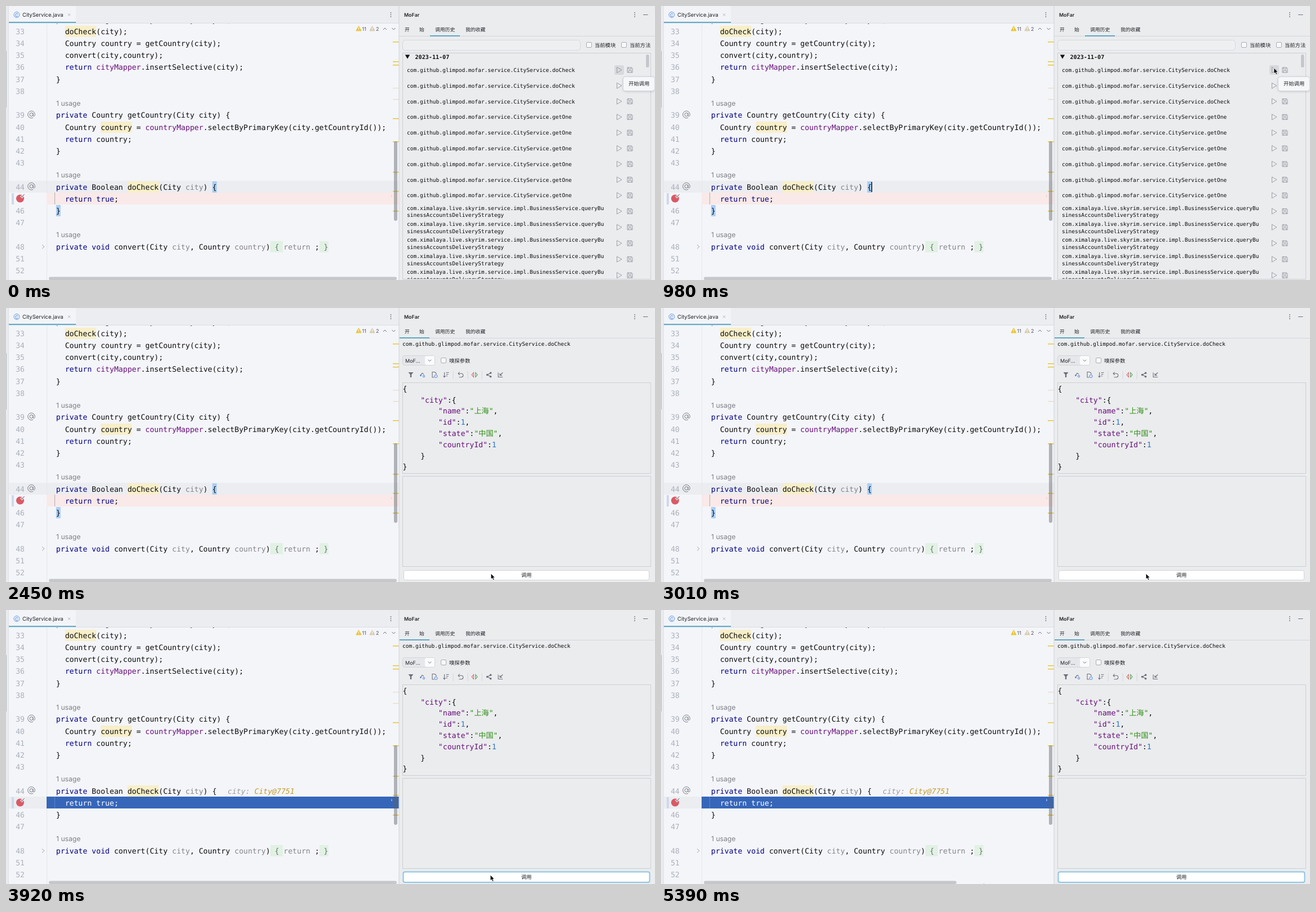
These frames come from a looping animation (1151x486 px, 5460 ms). An HTML page with a canvas:

```html
<!DOCTYPE html>
<html lang="zh">
<head>
<meta charset="utf-8">
<title>Editor demo</title>
<style>
html, body { margin: 0; width: 100%; height: 100%; overflow: hidden; background: #ebecee; }
canvas { display: block; }
</style>
</head>
<body>
<canvas id="stage" width="1151" height="486"></canvas>
<script>
const ctx = document.getElementById('stage').getContext('2d');
ctx.textRendering = 'geometricPrecision';
ctx.fontKerning = 'none';
const LOOP = 5460, STEP = 70;
const OPEN_PANEL = 1050, BREAK_HIT = 3780, NARROW_BAR = 4480;
const MONO = '"DejaVu Sans Mono", "Noto Sans CJK SC", monospace';
const UI = 'Inter, "Noto Sans CJK SC", sans-serif';
const CODE = '13.15px ' + MONO, LIST = '9.53px ' + MONO;
const CW = 7.917, LEFT = 88.8, PITCH = 21.22;
const INK = '#0c0c0e', KEY = '#000080', FIELD = '#660e7a', DIM = '#858589', ICON = '#6c707a';
const SERVICE = 'com.github.glimpod.mofar.service.CityService.';

function box(x, y, w, h, fill) {
  ctx.fillStyle = fill;
  ctx.fillRect(x, y, w, h);
}

function round(x, y, w, h, r, fill, stroke, width = 1) {
  ctx.beginPath();
  ctx.roundRect(x, y, w, h, r);
  if (fill) { ctx.fillStyle = fill; ctx.fill(); }
  if (stroke) { ctx.strokeStyle = stroke; ctx.lineWidth = width; ctx.stroke(); }
}

function text(s, x, y, font, color, align = 'left') {
  ctx.font = font;
  ctx.fillStyle = color;
  ctx.textAlign = align;
  ctx.fillText(s, x, y);
}

// Draws [string, color] pairs one after the other.
function runs(parts, x, y, font) {
  for (const [s, color] of parts) {
    text(s, x, y, font, color);
    x += ctx.measureText(s).width;
  }
}

function path(d, stroke, fill, x = 0, y = 0, width = 1) {
  ctx.save();
  ctx.translate(x, y);
  const p = new Path2D(d);
  if (fill) { ctx.fillStyle = fill; ctx.fill(p); }
  if (stroke) { ctx.strokeStyle = stroke; ctx.lineWidth = width; ctx.stroke(p); }
  ctx.restore();
}

function disc(x, y, r, fill, stroke) {
  ctx.beginPath();
  ctx.arc(x, y, r, 0, 7);
  ctx.fillStyle = fill;
  ctx.fill();
  if (stroke) { ctx.strokeStyle = stroke; ctx.lineWidth = 1; ctx.stroke(); }
}

function kebab(x, y) {
  for (const d of [-3.5, 0, 3.5]) disc(x, y + d, 0.9, ICON);
}

const rowY = i => 45 + i * PITCH;
const rowTop = i => Math.round(rowY(i) - 10.9);
const col = n => LEFT + n * CW;

function codeLine(row, indent, ...parts) {
  runs(parts, col(indent), rowY(row) + 4.8, CODE);
}

function mark(row, from, count, color) {
  box(col(from), rowTop(row) + 1, count * CW, 20, color);
}

function warning(x, color) {
  path('M0 -4.3L4.6 4H-4.6Z', color, color, x, 40);
  box(x - 0.5, 37.8, 1, 3.4, '#fff');
  box(x - 0.5, 42, 1, 1, '#fff');
}

function drawTabs() {
  box(0, 0, 697, 30, '#ebedf0');
  box(5, 0, 119, 30, '#f2f4f8');
  box(0, 30, 697, 1, '#dcdee3');
  box(5, 28, 119, 2, '#60acc8');
  disc(19, 15.5, 5, '#e6effc', '#6f9ad8');
  text('C', 19, 18.6, '8px ' + UI, '#4a7dca', 'center');
  text('CityService.java', 29, 19, '9.5px ' + UI, '#202226');
  path('M-2 -2L2 2M2 -2L-2 2', '#a9acb3', null, 112, 15.5, 0.9);
  kebab(682.5, 15.5);
}

function drawGutter() {
  const labels = ['33', '34', '35', '36', '37', '38', '', '39', '40', '41', '42', '43', '',
    '44', '', '46', '47', '', '48', '51', '52'];
  labels.forEach((n, i) => text(n, 33, rowY(i) + 4.8, CODE, '#abb0bb', 'right'));
  for (const row of [7, 13]) {
    path('M3 -2.8V1.2Q3 3 4.5 3Q6.3 3 6.3 0A6.3 6.3 0 1 0 3.2 5.4M3 0A3 3 0 1 0 -3 0A3 3 0 1 0 3 0',
      '#777b83', null, 45, rowY(row) - 1);
  }
  box(10, rowTop(14) + 1, 4, 20, '#cdd9eb');
  disc(25, 341.5, 7, '#da5965');
  path('M26 336.5L28.3 339L32.5 334', '#fff', null, 0, 0, 3);
  path('M26 336.5L28.3 339L32.5 334', '#5a5d63', null, 0, 0, 1.1);
  path('M-2 -3.5L2 0L-2 3.5', '#a4a8b0', null, 66, rowY(18));
}

function drawCode(paused, caret) {
  box(4, 31, 693, 455, '#f4f5f9');
  box(4, rowTop(paused ? 14 : 13), 693, 21, '#ebedf1');
  box(72, 31, 1, 455, '#e4e6eb');
  box(72, rowTop(14), 625, 21, paused ? '#3666b9' : '#f9e9e8');
  box(86, rowTop(14), 1, 21, paused ? '#5d85c8' : '#aeb0b8');

  const hint = '#f8efc9', fold = '#e1f1e4', brace = '#a9cef5';
  mark(0, 2, 7, hint);
  mark(8, 10, 7, hint);
  mark(13, 16, 7, hint);
  mark(18, 48, 2.8, fold);
  mark(18, 59, 2, fold);
  if (!paused) {
    mark(13, 35, 1, brace);
    mark(15, 0, 1, brace);
  }

  ctx.save();
  ctx.beginPath();
  ctx.rect(73, 31, 612, 455);
  ctx.clip();
  codeLine(-1, 0, ['public ', KEY], ['Integer addCityInfo(City city) {', INK]);
  codeLine(0, 2, ['doCheck(city);', INK]);
  codeLine(1, 2, ['Country country = getCountry(city);', INK]);
  codeLine(2, 2, ['convert(city,country);', INK]);
  codeLine(3, 2, ['return ', KEY], ['cityMapper', FIELD], ['.insertSelective(city);', INK]);
  codeLine(4, 0, ['}', INK]);
  codeLine(7, 0, ['private ', KEY], ['Country getCountry(City city) {', INK]);
  codeLine(8, 2, ['Country country = ', INK], ['countryMapper', FIELD],
    ['.selectByPrimaryKey(city.getCountryId());', INK]);
  codeLine(9, 2, ['return ', KEY], ['country;', INK]);
  codeLine(10, 0, ['}', INK]);
  codeLine(13, 0, ['private ', KEY], ['Boolean doCheck(City ', INK], ['city', DIM], [') {', INK]);
  codeLine(14, 2, ['return true', paused ? '#fff' : KEY], [';', paused ? '#fff' : INK]);
  codeLine(15, 0, ['}', INK]);
  codeLine(18, 0, ['private void ', KEY], ['convert(City ', INK], ['city', DIM], [', Country ', INK],
    ['country', DIM], [') ', INK], ['{ ', '#68766b'], ['return ', DIM], ['; ', INK], ['}', '#68766b']);
  for (const row of [6, 12, 17]) text('1 usage', 89, rowY(row) + 4.4, '12.2px ' + UI, '#7e8086');
  if (paused) {
    runs([['city: ', '#9a9ca2'], ['City@7751', '#c19a2c']], 393, rowY(13) + 4.8, 'italic ' + CODE);
  }
  ctx.restore();
  if (caret) box(373, rowTop(13) + 2, 1.4, 18, '#000');
  box(683.5, 335.5, 1, 3.5, paused ? '#dce6f7' : '#dccbcf');
}

function drawEditorEdges(narrow) {
  warning(625.5, '#ecc52f');
  text('11', 631.5, 43.6, '9px ' + UI, '#53565d');
  warning(649.5, '#d8cdb0');
  text('2', 656, 43.6, '9px ' + UI, '#53565d');
  path('M-3 1.5L0 -1.5L3 1.5', ICON, null, 672, 40.5);
  path('M-3 -1.5L0 1.5L3 -1.5', ICON, null, 687.5, 40.5);
  for (const y of [63, 98, 104, 199, 240, 294, 328, 363]) box(686, y, 11, 1.5, '#e5c63c');
  for (const y of [145, 165]) box(686, y, 11, 1.3, '#e4dfc5');
  round(688, 240, 6, 141, 3, 'rgba(95,98,104,.46)');
  round(76, 480.5, narrow ? 448 : 617, 5.5, 2.7, '#c5c7cb');
  box(0, 0, 4, 486, '#e9ebee');
  box(4, 0, 1, 486, '#dfe1e5');
  box(0, 80, 1, 100, '#b4b7bc');
}

function checkbox(x, y, label) {
  round(x + 0.5, y - 4.5, 9, 9, 1.5, '#f8f9fa', '#a9acb3');
  text(label, x + 15, y + 3.5, '9.3px ' + UI, '#202226');
}

function drawPanelHead(calling) {
  box(697, 0, 454, 486, '#ebecee');
  box(696.5, 0, 1, 486, '#d0d2d7');
  text('MoFar', 706, 19, '600 8.8px ' + UI, '#202226');
  kebab(1115, 15.5);
  box(1130, 15, 8.5, 1, ICON);
  box(697, 53, 454, 1, '#d3d5da');
  [['开', 707], ['始', 733], ['调用历史', 761], ['我的收藏', 815]].forEach(([s, x]) =>
    text(s, x, 45, '8.8px ' + UI, '#202226'));
  box(calling ? 698 : 752, 52, 53, 2, '#5ba8c3');
}

function rowIcons(y) {
  path('M-4 -5L4.5 0L-4 5Z', '#92969e', null, 1087.5, y, 0.9);
  path('M-4.5 -4.5H3L4.5 -3V4.5H-4.5ZM-2.5 -4.5V-1.5H2.2V-4.5M-2.5 4.5V1H2.5V4.5',
    '#868a92', null, 1106.5, y, 0.8);
}

function drawHistory() {
  round(703.5, 60.5, 315, 18, 5, '#eeeff1', '#d6d8dd');
  checkbox(1029, 69, '当前模块');
  checkbox(1091, 69, '当前方法');
  ctx.strokeStyle = '#cccfd4';
  ctx.lineWidth = 1;
  ctx.strokeRect(703.5, 83.5, 440, 401);
  ctx.save();
  ctx.beginPath();
  ctx.rect(704, 84, 439, 400);
  ctx.clip();
  path('M-4.2 -3.5H4.2L0 3.8Z', null, '#111', 712, 90);
  text('2023-11-07', 725.5, 94, 'bold 10.1px ' + MONO, '#111');
  round(1079, 105, 17, 17, 3, '#d7d9dc');
  for (let i = 0; i < 9; i++) {
    const y = 113.8 + i * 27.8;
    text(SERVICE + (i < 3 ? 'doCheck' : 'getOne'), 711, y + 3.2, LIST, INK);
    rowIcons(y - 0.3);
  }
  for (let i = 0; i < 5; i++) {
    const y = 364 + i * 28.4;
    text('com.ximalaya.live.skyrim.service.impl.BusinessService.queryBu', 711, y - 2.5, LIST, INK);
    text('sinessAccountsDeliveryStrategy', 711, y + 10.3, LIST, INK);
    rowIcons(y);
  }
  ctx.restore();
  round(1135, 86, 5.5, 23, 2.7, '#c4c6ca');

  ctx.save();
  ctx.shadowColor = 'rgba(0,0,0,.18)';
  ctx.shadowBlur = 4;
  ctx.shadowOffsetY = 1;
  round(1094.5, 125.5, 56, 25, 4, '#f6f7f9');
  ctx.restore();
  round(1094.5, 125.5, 56, 25, 4, null, '#d3d5da');
  text('开始调用', 1104, 141, '9.3px ' + UI, '#202226');
}

function drawToolbar() {
  const y = 118.5, w = 1.1;
  path('M-4.5 -4.5H4.5L1.2 -0.5V4.5H-1.2V-0.5Z', null, ICON, 718, y);
  path('M-3 0.5L-0.5 -3L2.5 -1', ICON, null, 738.5, y, w);
  disc(735.5, 119.5, 1.5, '#5a87cf');
  disc(741, 121, 1.7, '#ebecee', '#5a87cf');
  path('M3 -1V-2.5L0.5 -5H-4V4.5H-0.5', ICON, null, 760, y, w);
  disc(762.5, 121, 2.6, '#dfe9f9', '#5a87cf');
  path('M-3 -4.5V4M-5 2L-3 4.3L-1 2M0 -4H5M0 -1H4M0 2H2.5', ICON, null, 780.5, y, w);
  path('M-1.5 -5L-4 -2.3L-1.5 0.3M-4 -2.3H1.5A3.2 3.2 0 0 1 1.5 4.2H-2.5', ICON, null, 806, y, w);
  path('M-1.7 -4L-5 0L-1.7 4Z', '#d9676c', null, 831, y, w);
  path('M1.7 -4L5 0L1.7 4Z', '#5aa35e', null, 831, y, w);
  path('M3 -3.3L-3 0L3 3.3', ICON, null, 856.5, y, w);
  for (const [dx, dy] of [[3, -3.3], [-3, 0], [3, 3.3]]) disc(856.5 + dx, y + dy, 1.8, ICON);
  path('M4 -4L-1 1M-1 -2.5V1H2.8M-4 -4V4H4', ICON, null, 877, y, w);
  for (const x of [792.5, 818.5, 843.5]) box(x, 112, 1, 14, '#d3d5da');
}

function drawCall(focused) {
  text(SERVICE + 'doCheck', 703, 67.4, LIST, INK);
  round(703.5, 84.5, 57, 17, 3, '#e5e7ea', '#d3d5da');
  round(743, 85, 17, 16, 3, '#fafbfc');
  text('MoF...', 708, 96.5, '9px ' + UI, '#202226');
  path('M-2.8 -1.3L0 1.5L2.8 -1.3', ICON, null, 751.5, 93);
  checkbox(771, 93, '嗅探参数');
  drawToolbar();
  ctx.strokeStyle = '#cccfd4';
  ctx.lineWidth = 1;
  ctx.strokeRect(703.5, 132.5, 440, 161);
  ctx.strokeRect(703.5, 298.5, 440, 160);

  const str = '#2f8f16', num = '#2673c4';
  const pair = (key, value, color, end) => [8, [`"${key}"`, FIELD], [':', INK], [value, color], [end, INK]];
  [
    [0, ['{', INK]],
    [4, ['"city"', FIELD], [':{', INK]],
    pair('name', '"上海"', str, ','),
    pair('id', '1', num, ','),
    pair('state', '"中国"', str, ','),
    pair('countryId', '1', num, ''),
    [4, ['}', INK]],
    [0, ['}', INK]]
  ].forEach(([indent, ...parts], i) => runs(parts, 703.5 + indent * CW, 147.8 + i * 19.8, CODE));

  if (focused) round(704.5, 464.5, 437, 18.5, 3, '#fff', '#8bc5e3', 2);
  else round(705.5, 465.5, 435, 17, 3, '#fff', '#cfd2d7');
  text('调用', 923, 477.4, '9.3px ' + UI, '#202226', 'center');
}

// time, x, y of the pointer
const ROUTE = [[70, 1087, 110], [980, 1087, 110], [1190, 968, 170], [1400, 880, 228], [1540, 854, 249],
  [1750, 854, 268], [2240, 860, 466], [2380, 860, 471], [3430, 860, 471], [3570, 859, 470],
  [4410, 859, 470], [4970, 640, 483], [5390, 572, 484.5]];

function drawPointer(t) {
  const i = ROUTE.findIndex(p => p[0] >= t);
  if (t < ROUTE[0][0] || i < 0) return;
  const b = ROUTE[i], a = ROUTE[Math.max(0, i - 1)];
  const k = b === a ? 0 : (t - a[0]) / (b[0] - a[0]);
  const x = a[1] + (b[1] - a[1]) * k, y = a[2] + (b[2] - a[2]) * k;
  const overJson = t >= OPEN_PANEL && y > 133 && y < 293;
  if (overJson) {
    path('M-2.5 -5.5Q0 -5.5 0 -4Q0 -5.5 2.5 -5.5M0 -4V4.5M-2.5 6Q0 6 0 4.5Q0 6 2.5 6M-1.5 2H1.5',
      '#222', null, x, y, 1);
  } else {
    path('M0 0V10L2.3 7.9L4 11.6L5.8 10.8L4.2 7.2H7.2Z', '#fff', '#000', x, y, 0.8);
  }
}

function draw(t) {
  const paused = t >= BREAK_HIT, calling = t >= OPEN_PANEL;
  ctx.clearRect(0, 0, 1151, 486);
  drawCode(paused, t >= 560 && t < OPEN_PANEL);
  drawGutter();
  drawTabs();
  drawEditorEdges(t >= NARROW_BAR);
  drawPanelHead(calling);
  if (calling) drawCall(paused);
  else drawHistory();
  drawPointer(t);
}

const start = performance.now();
function tick() {
  const t = (performance.now() - start) % LOOP;
  draw(Math.floor(t / STEP) * STEP);
  requestAnimationFrame(tick);
}
tick();
</script>
</body>
</html>
```
